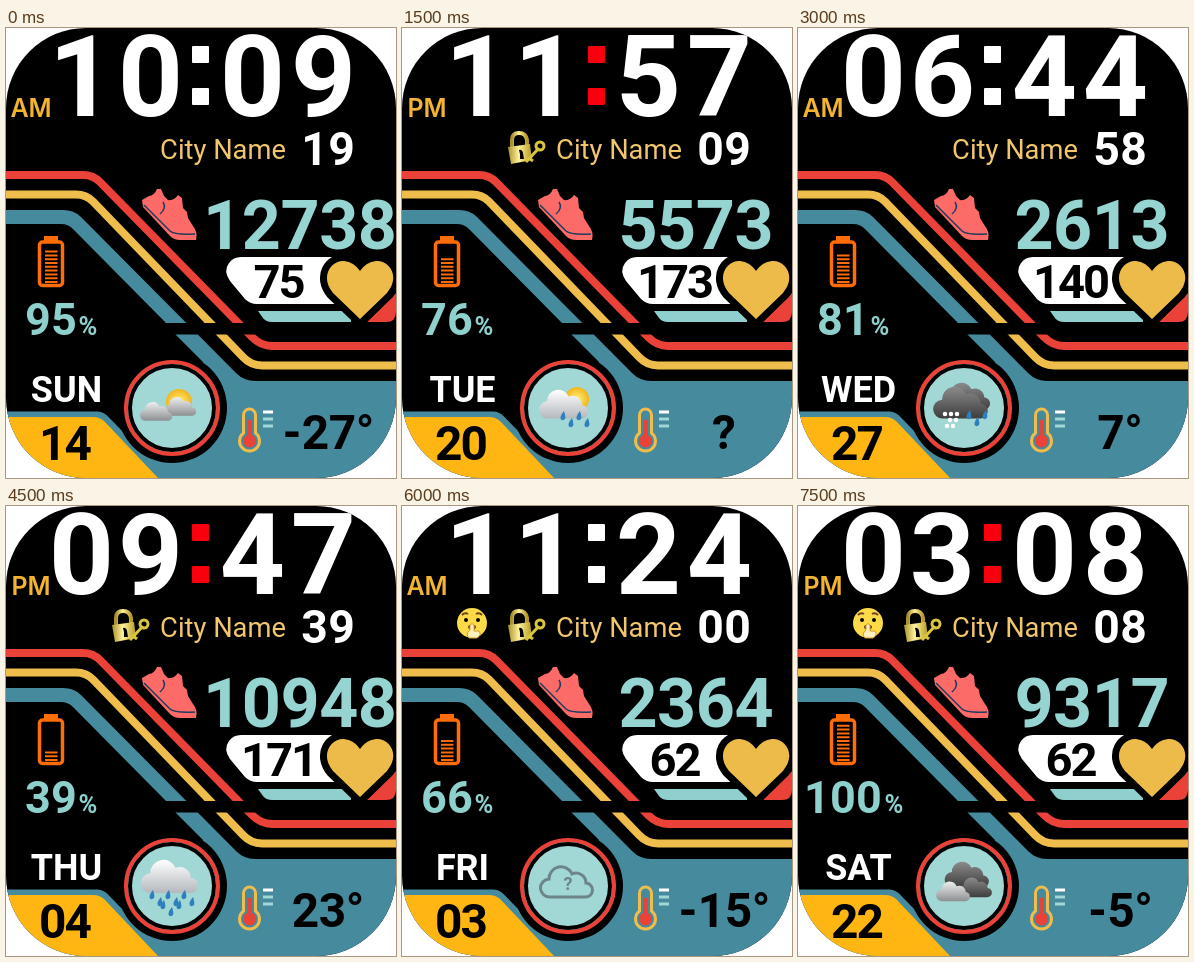
An HTML page that plays this animation: 390x450 px, repeating every 8000 ms.

```html
<!DOCTYPE html>
<html lang="en">
<head>
<meta charset="utf-8">
<title>Watch face</title>
<style>
  html, body { margin: 0; width: 100%; height: 100%; overflow: hidden; background: #fff; }
  svg { display: block; width: 390px; height: 450px; }
  text { font-family: Roboto, sans-serif; font-weight: 700; text-anchor: middle; }
  .line { fill: none; stroke-width: 8; }
</style>
</head>
<body>
<svg viewBox="0 0 390 450">
  <defs>
    <clipPath id="screen"><rect width="390" height="450" rx="80"/></clipPath>
    <linearGradient id="light" x2="0" y2="1"><stop stop-color="#fff"/><stop offset="1" stop-color="#b4b8bd"/></linearGradient>
    <linearGradient id="mid" x2="0" y2="1"><stop stop-color="#eee"/><stop offset="1" stop-color="#8d9092"/></linearGradient>
    <linearGradient id="dark" x2="0" y2="1"><stop stop-color="#8b8b8b"/><stop offset="1" stop-color="#3d3d3d"/></linearGradient>
    <radialGradient id="sun"><stop stop-color="#fff27a"/><stop offset="1" stop-color="#f2b51c"/></radialGradient>
    <linearGradient id="gold"><stop stop-color="#a8912c"/><stop offset=".45" stop-color="#fff29a"/><stop offset="1" stop-color="#b59a20"/></linearGradient>
    <path id="cloud" d="M-18 11a9 9 0 0 1-1-18a12 12 0 0 1 23-5a10 10 0 0 1 14 9a7 7 0 0 1-1 14Z"/>
    <path id="drop" d="M1 -5Q-4 1-2 3.500Q0 5 2 3Q3 1 1-5Z" fill="#2f7fbd"/>
  </defs>

  <g clip-path="url(#screen)">
    <rect width="390" height="450"/>

    <!-- Stripes and panels -->
    <path fill="#468a9d" d="M0 182H57Q68 182 75 189L230 345Q238 353 249 353H390V450H0V383.500H91Q97 383.500 102 388.500L120 407L166 380L197 334L170 307L160 295L67 201Q62 196 55 196H0Z"/>
    <path fill="#ffb612" d="M0 389H87Q94 389 99 394L152 450H0Z"/>
    <path class="line" stroke="#ea4238" d="M0 147H77Q87 147 94 154L246 309Q255 318 266 318H390"/>
    <path class="line" stroke="#efbd4b" d="M0 166.500H70Q80 166.500 87 173.500L237 329Q245 337.500 256 337.500H390"/>
    <rect x="155" y="295" width="235" height="11.500"/>

    <!-- Heart rate -->
    <path fill="#8fd0cf" d="M252 283H345V294H266Q260 294 257 290Z"/>
    <path fill="#ea4238" d="M361 294L390 265V284Q390 294 380 294Z"/>
    <path fill="#fff" d="M235 229H330V276H251Q244 276 239 271L224 253Q217 243 223 235Q227 229 235 229Z"/>
    <path fill="#edbb4a" stroke="#000" stroke-width="14" stroke-linejoin="round" paint-order="stroke"
      d="M354 291L327 265C313 248 326 232 338 233Q348 234 354 243Q360 234 370 233C383 232 395 248 381 265Z"/>

    <!-- Shoes -->
    <path fill="#fc6b67" d="M136 172L143 168Q148 168 151 161H155L158 168L162 172Q168 173 172 167L176 170L177 180L181 184L182 190L187 198Q192 204 190 212H174Q168 212 164 208L137 179Z"/>
    <path fill="none" stroke="#213a5d" stroke-width="1.500" d="M138 177L164 203Q168 207 189 206M157 174Q161 180 154 186"/>

    <!-- Battery -->
    <g fill="none" stroke="#ff6c08">
      <rect x="33.500" y="214" width="23" height="43.500" rx="3" stroke-width="3.500"/>
      <path d="M38 210.500H52" stroke-width="5"/>
      <path id="bars" stroke-width="2"/>
    </g>

    <!-- Weather badge -->
    <circle cx="166" cy="380" r="55"/>
    <circle cx="166" cy="380" r="46" fill="#a1d7d5" stroke="#ea4238" stroke-width="4"/>
    <circle cx="166" cy="380" r="42" fill="none" stroke="#000" stroke-width="4"/>
    <g id="weather"></g>

    <!-- Thermometer -->
    <path fill="#468a9d" stroke="#efbd4b" stroke-width="3" d="M237.500 405V387a6 6 0 0 1 12 0V405a10 10 0 1 1-12 0Z"/>
    <path stroke="#ea4238" stroke-width="5" stroke-linecap="round" d="M243.500 394V412"/>
    <circle cx="243.500" cy="413" r="6.500" fill="#ea4238"/>
    <path stroke="#fff" stroke-width="3" d="M257 384H267"/>
    <path stroke="#a1d7d5" stroke-width="3" d="M257 391H267M257 398H267"/>

    <!-- Status icons -->
    <g id="lock">
      <path fill="none" stroke="url(#gold)" stroke-width="4" d="M110 120V112Q110 105 117 105Q124 105 125 112V120"/>
      <path fill="url(#gold)" d="M106 119L128 116L130 132L109 136Z"/>
      <path d="M117 122a3 3 0 0 1 4 3l1 6h-4l0-5Z"/>
      <path fill="none" stroke="#d8c53c" stroke-width="3" d="M124 134L137 120M127 130l4 3"/>
      <circle cx="138" cy="118" r="4" fill="none" stroke="#d8c53c" stroke-width="3"/>
    </g>
    <g id="quiet">
      <circle cx="70" cy="117" r="15" fill="#fddb48"/>
      <path fill="none" stroke="#6b431c" stroke-width="2" d="M60 109q3-3 6-1M74 108q3-2 6 1"/>
      <circle cx="64" cy="114" r="2"/><circle cx="76" cy="114" r="2"/>
      <ellipse cx="70" cy="121" rx="4" ry="2.500" fill="#6b431c"/>
      <path fill="#fff0c0" stroke="#d99a25" d="M68 119q2-3 4 0v6h5q3 4-2 7h-8q-4-4 1-8Z"/>
    </g>

    <g id="colon">
      <rect x="186" y="18" width="17" height="17" rx="1"/>
      <rect x="186" y="60" width="17" height="17" rx="1"/>
    </g>
    <text x="217" y="131" fill="#f1c66d" style="font-size:27.300px;font-weight:400">City Name</text>
    <text id="half" x="25" y="89" fill="#f3b431" style="font:600 25px Inter,sans-serif"></text>
    <text id="day" x="60.500" y="373.500" fill="#fff" font-size="36"></text>
    <text id="percent" y="307" fill="#8dd0cc" font-size="25.500">%</text>
    <g id="numbers"></g>
  </g>
</svg>
<script>
const $ = id => document.getElementById(id);
const LOOP = 8000, STEP = 1500, CAP = 0.711;

const use = (id, x, y, attrs = "") => `<use href="#${id}" transform="translate(${x} ${y})" ${attrs}/>`;
const cloud = (tone, x, y, scale = 1) =>
  `<use href="#cloud" transform="translate(${x} ${y}) scale(${scale})" fill="url(#${tone})"/>`;
const sun = (x, y, r) => `<circle cx="${x}" cy="${y}" r="${r}" fill="url(#sun)"/>`;
const drops = (x, y, count) => Array.from({ length: count },
  (_, i) => use("drop", x + i * 8, y + (i % 2) * 7)).join("");

const weather = {
  fair: sun(173, 374, 13) + cloud("mid", 175, 381, .62) + cloud("mid", 151, 386, .62),
  showers: sun(175, 371, 12) + cloud("light", 163, 380, .95) + drops(161, 388, 4),
  sleet: cloud("dark", 170, 372, .9) + cloud("dark", 164, 379, 1.05) + drops(171, 387, 3) +
    `<path stroke="#fff" stroke-width="4.500" stroke-linecap="round" stroke-dasharray="0 6" d="M147 386H162M152 392H161M149 398H160"/>`,
  rain: cloud("light", 165, 375, 1.1) + drops(146, 389, 6) + drops(157, 399, 3),
  unknown: use("cloud", 166, 380, `fill="none" stroke="#6d8588" stroke-width="3"`) +
    `<text x="166" y="384" fill="#6d8588" font-size="18">?</text>`,
  cloudy: cloud("dark", 170, 372, .85) + cloud("dark", 178, 384, .65) + cloud("mid", 156, 388, .65)
};

const states = [
  { time: "1009", half: "AM", seconds: "19", steps: "12738", pulse: "75", battery: 95, day: "SUN", date: "14", temp: "-27°", sky: "fair" },
  { time: "1157", half: "PM", seconds: "09", steps: "5573", pulse: "173", battery: 76, day: "TUE", date: "20", temp: "?", sky: "showers", lock: true },
  { time: "0644", half: "AM", seconds: "58", steps: "2613", pulse: "140", battery: 81, day: "WED", date: "27", temp: "7°", sky: "sleet" },
  { time: "0947", half: "PM", seconds: "39", steps: "10948", pulse: "171", battery: 39, day: "THU", date: "04", temp: "23°", sky: "rain", lock: true },
  { time: "1124", half: "AM", seconds: "00", steps: "2364", pulse: "62", battery: 66, day: "FRI", date: "03", temp: "-15°", sky: "unknown", lock: true, quiet: true },
  { time: "0308", half: "PM", seconds: "08", steps: "9317", pulse: "62", battery: 100, day: "SAT", date: "22", temp: "-5°", sky: "cloudy", lock: true, quiet: true }
];

// Sets each character in its own cell, centred on x.
function number(value, x, baseline, height, pitch, color) {
  const cells = [...value].map(c => ({ "-": .74, "°": .67 }[c] || 1) * pitch);
  let left = x - cells.reduce((a, b) => a + b) / 2;
  const centers = cells.map(w => (left += w) - w / 2);
  return `<text x="${centers.join(" ")}" y="${baseline}" font-size="${height / CAP}" fill="${color}">${value}</text>`;
}

function show(s) {
  const mint = "#96d4d2";
  $("numbers").innerHTML =
    number(s.time.slice(0, 2), 110, 88, 81, 69, "#fff") +
    number(s.time.slice(2), 282, 88, 81, 71, "#fff") +
    number(s.seconds, 322, 137, 33, 27, "#fff") +
    number(s.steps, 294, 221, 48.5, 38.7, mint) +
    number(s.pulse, 273.5, 269.5, 33.5, 25, "#000") +
    number(String(s.battery), 45, 307, 32, 26, "#8dd0cc") +
    number(s.date, 59.5, 432, 34, 25.5, "#000") +
    number(s.temp, 322, 421, 34, 27, "#000");
  $("half").textContent = s.half;
  $("day").textContent = s.day;
  $("percent").setAttribute("x", s.battery > 99 ? 96 : 82);
  $("colon").setAttribute("fill", s.half === "PM" ? "#f8000d" : "#fff");
  $("bars").setAttribute("d", Array.from({ length: Math.floor(s.battery / 10) },
    (_, i) => `M39 ${254 - i * 3.8}H51.5`).join(""));
  $("weather").innerHTML = weather[s.sky];
  $("lock").style.display = s.lock ? "" : "none";
  $("quiet").style.display = s.quiet ? "" : "none";
}

let current = -1;
function tick() {
  const index = Math.floor(performance.now() % LOOP / STEP);
  if (index !== current) show(states[current = index]);
  requestAnimationFrame(tick);
}
tick();
</script>
</body>
</html>
```
